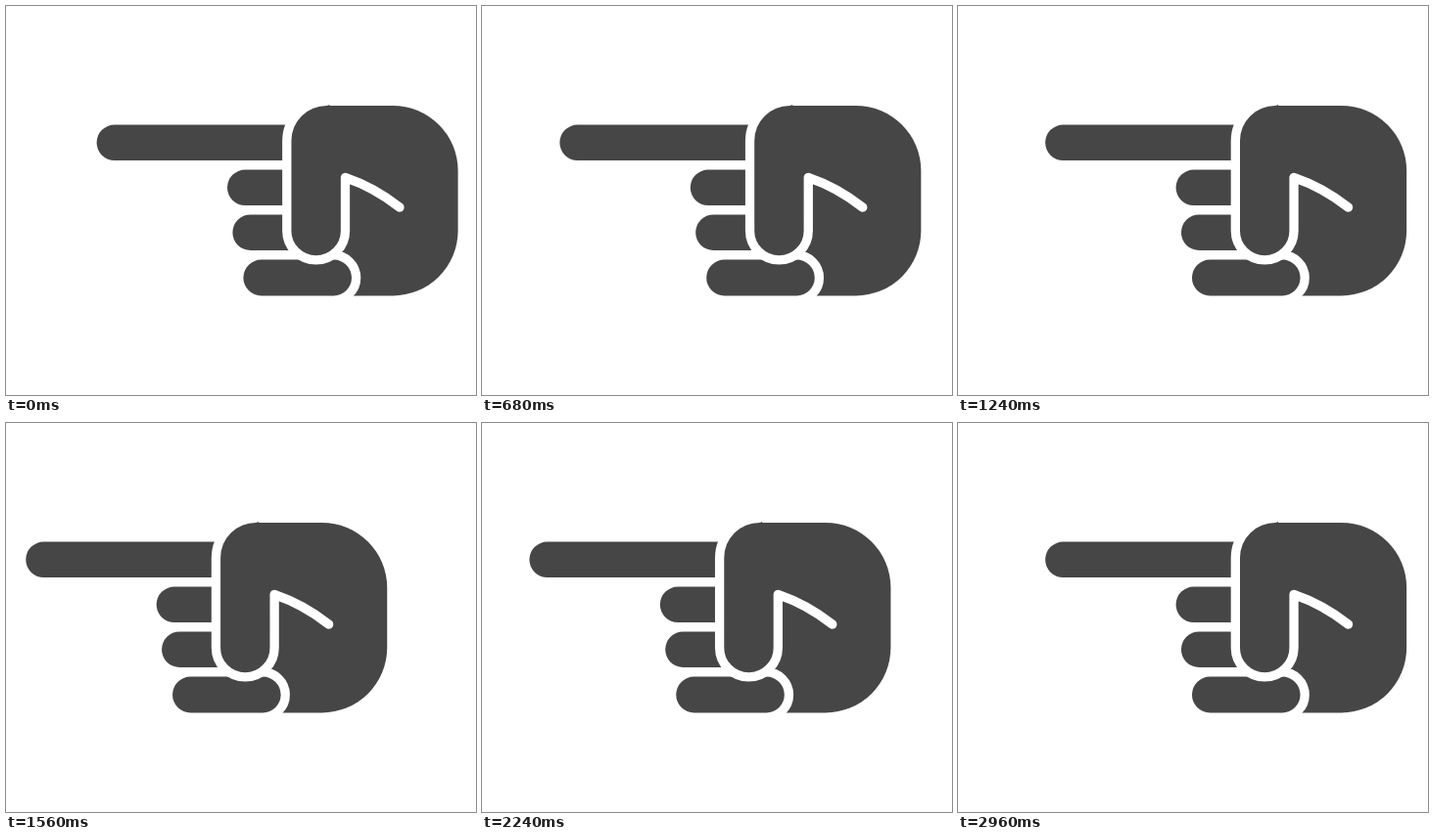
Recreate the animation shown at these times as an HTML page. Size 480 by 398 pixels, loop 3000 ms.

```html
<!DOCTYPE html>
<html lang="en">
<head>
<meta charset="utf-8">
<title>Pointing hand</title>
<style>
  html, body { margin: 0; height: 100%; overflow: hidden; background: #fff; }
  svg { display: block; }
  .hand { fill: #464646; }
  .gap { stroke: #fff; stroke-width: 9.3; stroke-linecap: round; stroke-linejoin: round; }
  .pinky { stroke: #fff; stroke-width: 18.6; paint-order: stroke; }
</style>
</head>
<body>
<svg width="480" height="398" viewBox="0 0 480 398">
  <g class="hand" id="hand">
    <rect x="92.6" y="121.5" width="225" height="36.6" rx="18.3"/>
    <rect x="226" y="167.5" width="90" height="36.6" rx="18.3"/>
    <rect x="231.4" y="213.4" width="85" height="36.6" rx="18.3"/>
    <!-- palm -->
    <path d="M327.5 102H395A66.6 66.6 0 0 1 461.6 168.6V229.8A66.6 66.6 0 0 1 395 296.4H327.5Z"/>
    <rect class="pinky" x="242.4" y="259.6" width="110.6" height="36.8" rx="18.4"/>
    <!-- thumb and crease -->
    <path class="gap" d="M402 206Q376 185.5 346.5 175.5V230A29.85 29.85 0 0 1 286.8 230V138A40.7 40.7 0 0 1 327.5 97.3"/>
  </g>
</svg>
<script>
  const hand = document.getElementById('hand');
  const PERIOD = 600, STEP = 40, REACH = 80;

  function draw(now) {
    // 25 steps per second; the small bias absorbs timer rounding
    const t = Math.floor((now + 1) / STEP) * STEP % 3000;
    const x = -REACH / 2 * (1 - Math.cos(2 * Math.PI * t / PERIOD));
    hand.setAttribute('transform', `translate(${x.toFixed(2)} 0)`);
    requestAnimationFrame(draw);
  }
  draw(performance.now());
</script>
</body>
</html>
```
